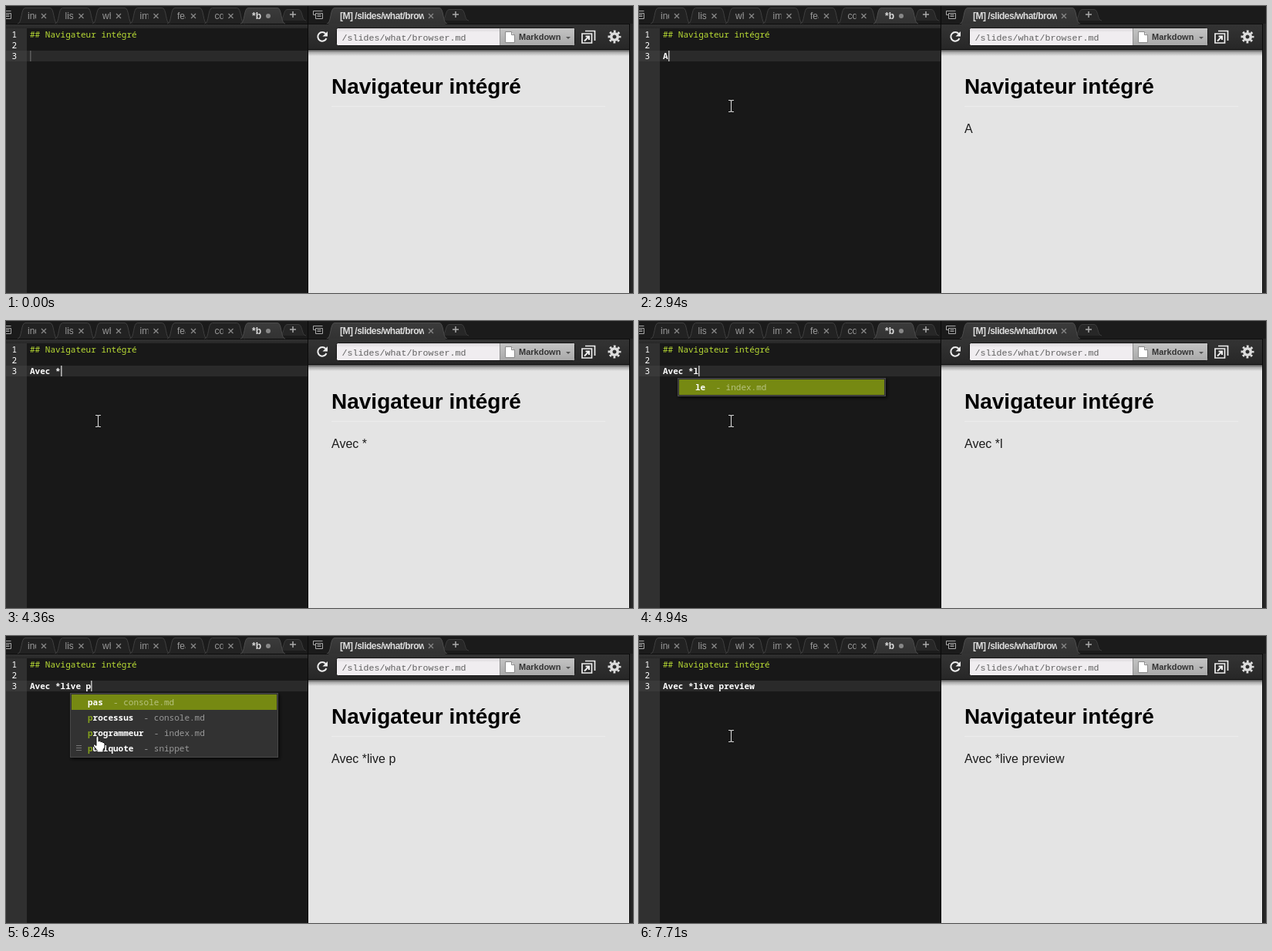
An HTML page for the animation above (8 s loop, 813 px wide and 373 px high).

```html
<!DOCTYPE html>
<html lang="fr">
<head>
<meta charset="utf-8">
<title>Navigateur intégré</title>
<style>
  html, body { margin: 0; width: 100%; height: 100%; overflow: hidden; background: #181818; }
  svg { display: block; }
  text { white-space: pre; font-kerning: none; font-variant-ligatures: none; }
  .code { font: 500 11px "Noto Sans Mono", monospace; fill: #fff; }
  .strong { font-weight: 600; }
  .ui { font: 12px "Liberation Sans", sans-serif; fill: #999; }
  .bold { font-weight: bold; fill: #ddd; }
  .page { font: 16px "Liberation Sans", sans-serif; fill: #1c1c1c; }
  .line { fill: none; stroke: #eee; stroke-width: 2; }
</style>
</head>
<body>
<svg id="stage" width="813" height="373">
  <defs>
    <linearGradient id="bar" x2="0" y2="1">
      <stop stop-color="#343434"/><stop offset="1" stop-color="#272727"/>
    </linearGradient>
    <linearGradient id="active" x2="0" y2="1">
      <stop stop-color="#3b3b3b"/><stop offset="1" stop-color="#323232"/>
    </linearGradient>
    <linearGradient id="field" x2="0" y2="1">
      <stop stop-color="#d8d5d8"/><stop offset=".25" stop-color="#f0edf0"/>
    </linearGradient>
    <linearGradient id="button" x2="0" y2="1">
      <stop stop-color="#c4c4c4"/><stop offset="1" stop-color="#a9a9a9"/>
    </linearGradient>
    <linearGradient id="shade" x2="0" y2="1">
      <stop stop-opacity=".65"/><stop offset=".4" stop-opacity=".25"/><stop offset="1" stop-opacity="0"/>
    </linearGradient>
    <filter id="shadow" x="-10%" y="-40%" width="120%" height="200%">
      <feDropShadow dx="1.500" dy="2" stdDeviation="2" flood-opacity=".8"/>
    </filter>
    <path id="menuIcon" fill="none" stroke="#aaa"
      d="M-2.500.5H-5.500V-4.500H6.500M-2.500-1.500H6.500V5.500H-2.500ZM-.5.5H4.500M-.5 2.500H4.500"/>
    <path id="cross" d="M-3-3L3 3M3-3L-3 3" stroke="#888" stroke-width="1.300"/>
    <path id="plus" d="M-4 0H4M0-4V4" stroke="#aaa" stroke-width="1.500"/>
    <path id="beamShape" fill="none"
      d="M-3.500-7.500H-1L0-6.500L1-7.500H3.500M0-6.500V6.500M-3.500 7.500H-1L0 6.500L1 7.500H3.500"/>
  </defs>

  <!-- Editor -->
  <rect width="392" height="373" fill="#181818"/>
  <rect y="29" width="27" height="344" fill="#303030"/>
  <rect y="58" width="27" height="14" fill="#393939"/>
  <rect x="27" y="58" width="364" height="14" fill="#2a2a2a"/>
  <rect width="813" height="23" fill="#1b1b1b"/>
  <rect y="23" width="391" height="6" fill="url(#bar)"/>
  <path d="M0 23.500H391" stroke="#0c0c0c"/>
  <g id="tabs"></g>
  <use href="#menuIcon" x="0" y="11"/>
  <g class="code">
    <text x="7.500" y="41">1</text>
    <text x="7.500" y="55">2</text>
    <text x="7.500" y="69">3</text>
    <text x="31" y="41" fill="#b9dc35">## Navigateur intégré</text>
    <text id="source" class="strong" x="31" y="69"></text>
  </g>
  <rect id="caret" y="58" width="1.600" height="14" fill="#b5b5b5"/>

  <!-- Preview -->
  <rect x="392" y="57" width="416" height="316" fill="#e4e4e4"/>
  <rect x="392" y="57" width="416" height="8" fill="url(#shade)"/>
  <rect x="392" y="23" width="416" height="34" fill="url(#bar)"/>
  <path d="M392 23.500H418M570 23.500H808M392 56.500H808" stroke="#101010"/>
  <rect x="808" y="23" width="5" height="350" fill="#262626"/>
  <path d="M391.500 0V373M808.500 23V373" stroke="#0a0a0a"/>
  <g id="pageTabs"></g>
  <use href="#menuIcon" x="404" y="11"/>

  <path class="line" d="M414.500 36A5.800 5.800 0 1 0 415.500 42"/>
  <path d="M417 33V39.500H410.500Z" fill="#eee"/>
  <rect x="428.500" y="28.500" width="309" height="23" rx="2" fill="url(#field)" stroke="#151515"/>
  <path d="M640 29H736Q737 29 737 30V50Q737 51 736 51H640Z" fill="url(#button)"/>
  <path d="M640.500 29V51" stroke="#909090"/>
  <text x="435.500" y="45" fill="#606060" font-family="Liberation Mono, monospace" font-size="11.670">/slides/what/browser.md</text>
  <path d="M647.500 33.500H655.500L659.500 37.500V47.500H647.500Z" fill="#fff" stroke="#8a8a8a"/>
  <path d="M655.500 33.500V37.500H659.500" fill="#ddd" stroke="#8a8a8a"/>
  <text class="ui bold" x="665" y="44" style="font-size:11px;fill:#333">Markdown</text>
  <path d="M726 40H732L729 43Z" fill="#555"/>
  <g class="line">
    <path d="M751 32.500H763.500V45M747 36H759.500V48H747Z" stroke-width="1.700"/>
    <path d="M750 45.500L756 39.500M751.500 39.500H756V44"/>
  </g>
  <g transform="translate(789 40)" fill="none" stroke="#ddd">
    <circle r="7" stroke-width="3" stroke-dasharray="2.750" stroke-dashoffset="1.375"/>
    <circle r="4.300" stroke-width="3.600"/>
  </g>

  <text class="page" x="422" y="114" style="font-size:28px;font-weight:bold;fill:#000">Navigateur intégré</text>
  <path d="M422 130.500H777" stroke="#ececec"/>
  <text id="preview" class="page" x="422" y="165"></text>

  <g id="popup"></g>

  <g id="beam">
    <use href="#beamShape" stroke="#000" stroke-width="2.400" stroke-opacity=".5"/>
    <use href="#beamShape" stroke="#ddd" stroke-width="1.100"/>
  </g>
  <path id="hand" transform="translate(112.500 129.500)" fill="#fff" stroke="#111"
    d="M4.500 13V2.500Q4.500.5 6 .5T7.500 2.500V7.500Q9.500 6 10.500 8Q12.500 7 13 9Q15.500 8 15.500 11V15L13.500 18.500V21.500H5.500V19L1 13.500Q.5 11 2.500 11.200Z"/>
</svg>
<script>
const $ = id => document.getElementById(id);
const LOOP = 8000, CHAR = 6.6;

// [start, typed text, caret opacity]
const typing = [
  [0, '', .35], [890, '', 1], [1420, '', 0], [1950, '', 1], [2510, '', 0],
  [2940, 'A', 1], [3060, 'Av', 1], [3180, 'Ave', 1], [3300, 'Avec', 1],
  [3450, 'Avec ', 1], [4110, 'Avec ', 0], [4360, 'Avec *', 1],
  [4940, 'Avec *l', 1], [5250, 'Avec *li', 1], [5400, 'Avec *live', 1],
  [5680, 'Avec *live ', 1], [6240, 'Avec *live p', 1], [6380, 'Avec *live pr', 1],
  [6500, 'Avec *live pre', 1], [6780, 'Avec *live prev', 1],
  [7030, 'Avec *live previe', 1], [7180, 'Avec *live preview', 1],
  [7710, 'Avec *live preview', 0]
];

// [start, x, y] of the pointer
const pointer = [[0, -50, -50], [500, 183.5, 281], [620, 119.5, 143.5], [770, 119.5, 130]];

const popups = {
  'Avec *l': { x: 50, items: [['le', 'index.md']] },
  'Avec *live p': { x: 83, items: [
    ['pas', 'console.md'], ['processus', 'console.md'],
    ['programmeur', 'index.md'], ['pullquote', 'snippet']
  ] }
};

function tab(left, right, fill, stroke, top = 2.5, bottom = 23) {
  return `<path fill="${fill}" stroke="${stroke}" d="M${left} ${bottom}C${left + 6} ${bottom} ${left + 4} ${top} ${left + 10} ${top}
    H${right - 10}C${right - 4} ${top} ${right - 6} ${bottom} ${right} ${bottom}"/>`;
}

function label(x, width, text, style = '') {
  return `<svg x="${x}" width="${width}" height="23"><text class="ui ${style}" y="17">${text}</text></svg>`;
}

function addTab(left, right, center) {
  return tab(left, right, '#272727', '#3c3c3c', 4.5, 19) + `<use href="#plus" x="${center}" y="11"/>`;
}

function buildTabs() {
  const names = ['index', 'list', 'what', 'image', 'features', 'console'];
  $('tabs').innerHTML = addTab(355, 389, 372) + names.map((name, i) => {
    const x = 28 + i * 48.5;
    return tab(x - 13, x + 39, '#222', '#404040') + label(x, 11, name) +
      `<use href="#cross" x="${x + 21}" y="13"/>`;
  }).join('') + tab(304, 362, 'url(#active)', '#4c4c4c') +
    label(319, 12, '*browser', 'bold') + '<circle cx="340" cy="13" r="3" fill="#888"/>';

  $('pageTabs').innerHTML = addTab(565, 600, 583) +
    tab(416, 572, 'url(#active)', '#4c4c4c') +
    `<g letter-spacing="-.5">${label(433, 109, '[M] /slides/what/browser.md', 'bold')}</g>` +
    '<use href="#cross" x="551" y="13"/>';
}

function popupMarkup({ x, items }) {
  const rows = items.map(([word, origin], i) => {
    const y = 90 + i * 20;
    const icon = origin === 'snippet'
      ? `<path d="M${x + 8} ${y - 7.5}h7m-7 3h7m-7 3h7" stroke="#777"/>` : '';
    return `${icon}<text class="code" x="${x + 23}" y="${y}"><tspan class="strong" fill="${i ? '#86a31c' : '#fff'}">${word[0]}</tspan><tspan class="strong">${word.slice(1)}</tspan><tspan fill="${i ? '#999' : '#b7c280'}">  - ${origin}</tspan></text>`;
  }).join('');
  return `<rect x="${x + .5}" y="74.5" width="269" height="${items.length * 20 + 3}" fill="#303030" stroke="#484848" filter="url(#shadow)"/>
    <rect x="${x + 2}" y="76" width="266" height="20" fill="#768912"/>${rows}`;
}

const current = (steps, time) => steps.findLast(step => step[0] <= time);
let shown;

function draw(now) {
  const time = now % LOOP;
  const [, text, opacity] = current(typing, time);
  const [, x, y] = current(pointer, time);
  const onList = text === 'Avec *live p';

  if (text !== shown) {
    shown = text;
    $('source').textContent = $('preview').textContent = text;
    $('popup').innerHTML = popups[text] ? popupMarkup(popups[text]) : '';
  }
  $('caret').setAttribute('x', Math.round(31 + text.length * CHAR));
  $('caret').setAttribute('opacity', opacity);
  $('beam').setAttribute('transform', `translate(${x} ${y})`);
  $('beam').style.display = onList ? 'none' : '';
  $('hand').style.display = onList ? '' : 'none';
  requestAnimationFrame(draw);
}

buildTabs();
draw(performance.now());
</script>
</body>
</html>
```
